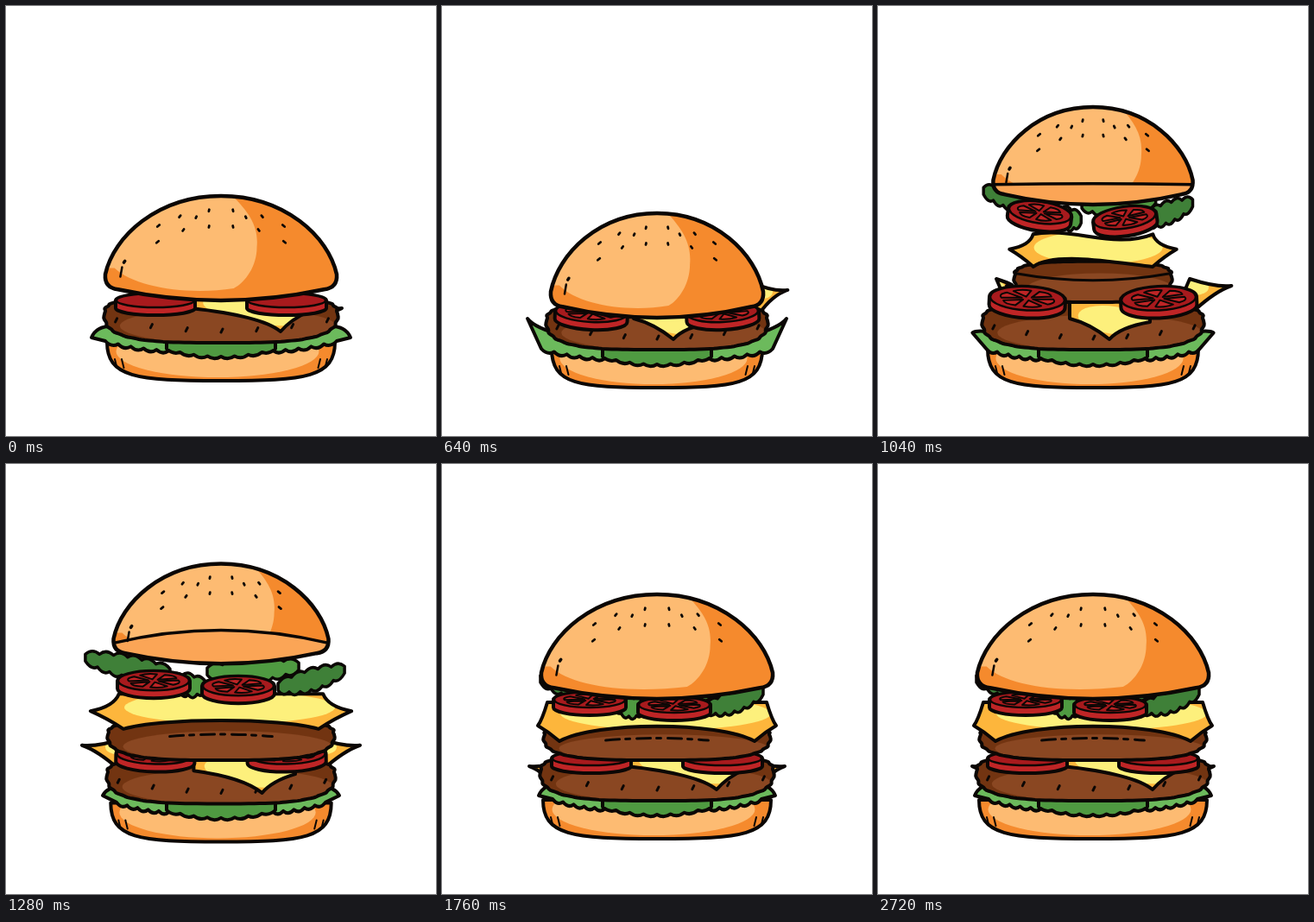
Write an HTML page with a canvas that moves like this. It is 498x498 px and loops after 2960 ms.

```html
<!DOCTYPE html>
<html lang="en">
<head>
<meta charset="utf-8">
<title>Burger</title>
<style>
html, body { margin: 0; width: 100%; height: 100%; overflow: hidden; background: #fff; }
canvas { display: block; }
</style>
</head>
<body>
<canvas id="stage" width="498" height="498"></canvas>
<script>
const ctx = document.getElementById('stage').getContext('2d');
const LOOP = 2960, STEP = 80, LAST = 2720, CX = 249;
const INK = '#0b0705', BUN = '#fdbb72', CRUST = '#f58a2d', UNDER = '#fba556';
const MEAT = '#8a4722', CHAR = '#723411', CHEESE = '#fdf07c', AMBER = '#fdb63c';
const LEAF = '#6cba5c', GREEN = '#4f9a41', DARK_GREEN = '#3f8038';
const RED = '#bf2526', DARK_RED = '#a81a1d';

const mix = (a, b, k) => a + (b - a) * k;
const ramp = (now, from, to) => Math.min(1, Math.max(0, (now - from) / (to - from)));
const ease = (now, from, to) => (1 - Math.cos(Math.PI * ramp(now, from, to))) / 2;

// The whole motion comes from a few values between 0 and 1.
function motionAt(now) {
  return {
    crouch: ease(now, 320, 640) - ease(now, 1040, 1480),
    stack: ramp(now, 720, 1120),
    lift: Math.sin(Math.PI * ramp(now, 880, 1400)) ** 2,
    grow: ramp(now, 720, 1200) ** 2,
    flick: ease(now, 160, 640) - ease(now, 640, 1240),
    flutter: ease(now, 240, 800) - ease(now, 1240, 1480),
    settle: ease(now, 1760, 2080),
    tilt: ramp(now, 1040, 1280),
    falling: now >= 1160
  };
}

function paint(path, fill, width = 4) {
  if (fill) { ctx.fillStyle = fill; ctx.fill(path); }
  if (width) { ctx.lineWidth = width; ctx.strokeStyle = INK; ctx.stroke(path); }
}

function paintLit(path, fill, lightFill, ...ellipse) {
  const light = new Path2D();
  light.ellipse(...ellipse, 0, 7);
  paint(path, fill, 0);
  ctx.save();
  ctx.clip(path);
  paint(light, lightFill, 0);
  ctx.restore();
  paint(path);
}

function line(x0, y0, x1, y1, width = 3) {
  const p = new Path2D();
  p.moveTo(x0, y0);
  p.lineTo(x1, y1);
  paint(p, null, width);
}

// Scalloped edge from one point to another, sagging in the middle.
function scallop(p, x0, y0, x1, y1, count, depth, sag = 0) {
  const at = k => [mix(x0, x1, k), mix(y0, y1, k) + 4 * sag * k * (1 - k)];
  p.lineTo(x0, y0);
  for (let i = 1; i <= count; i++) {
    const [mx, my] = at((i - .5) / count);
    p.quadraticCurveTo(mx, my + depth, ...at(i / count));
  }
}

function bottomBun({ crouch }) {
  const w = 132 - 10 * crouch, b = 434 + 8 * crouch, top = b - 45;
  const p = new Path2D();
  p.moveTo(CX - w, top);
  p.bezierCurveTo(CX - w, b - 4, CX - .75 * w, b, CX, b);
  p.bezierCurveTo(CX + .75 * w, b, CX + w, b - 4, CX + w, top);
  p.closePath();
  paintLit(p, CRUST, BUN, CX - 4, b - 34, w * .89, 30, 0);
  for (const side of [-1, 1])
    for (const inset of [9, 17])
      line(CX + side * (w - inset), b - 25, CX + side * (w - inset - 2.5), b - 15, 2);
}

function lettuce({ crouch, flick, stack }) {
  const y = 388 + 9 * crouch, reach = 150 - 13 * stack, tipY = 384 - 22 * flick;
  for (const side of [-1, 1]) {
    const p = new Path2D(), x = d => CX + side * d;
    p.moveTo(x(reach), tipY);
    p.quadraticCurveTo(x(reach - 8), y - 24, x(reach - 45), y - 14);
    p.lineTo(x(60), y - 10);
    scallop(p, x(60), y + 11, x(reach - 16), y, 5, 6, 2);
    p.closePath();
    paint(p, LEAF);
  }
  const middle = new Path2D();
  middle.moveTo(CX + 63, y - 10);
  middle.lineTo(CX - 63, y - 10);
  scallop(middle, CX - 63, y + 9, CX + 63, y + 9, 8, 5, 9);
  middle.closePath();
  paint(middle, GREEN);
}

function pattyShape(w, top, b) {
  const p = new Path2D(), mid = (top + b) / 2 - 6;
  const bend = (v, power) => Math.sign(v) * Math.abs(v) ** power;
  for (let a = 0; a < 2 * Math.PI; a += .04) {
    const s = Math.sin(a), bump = Math.sin(a * 26) * .9;
    p.lineTo(CX + (w - 1) * bend(Math.cos(a), .6) + bump, mid + (s > 0 ? b - mid : mid - top) * bend(s, .7));
  }
  p.closePath();
  paintLit(p, CHAR, MEAT, CX + 8, mid + 14, w * .92, (b - top) * .38, 0);
}

function lowerPatty({ crouch }) {
  const w = 136 - 7 * crouch, top = 335 + 8 * crouch, b = top + 55;
  pattyShape(w, top, b);
  for (let u = -.9; u < 1; u += .3) {
    const x = CX + u * w, y = b - 12 - 15 * u * u;
    line(x, y, x + 2, y - 4);
  }
}

function upperPatty({ crouch, lift, grow, falling }) {
  const w = mix(60, 132, grow), top = 300 - 18 * lift + 8 * crouch, seam = new Path2D();
  pattyShape(w, top, 343);
  const half = w * (falling ? .45 : .97), y = falling ? top + 20 : top + 14;
  seam.moveTo(CX - half, y);
  seam.quadraticCurveTo(CX, falling ? y - 5 : y + 16, CX + half, y);
  if (falling) ctx.setLineDash([16, 7, 5, 8]);
  paint(seam, null, 3);
  ctx.setLineDash([]);
}

function cheeseCorners({ flutter, stack, settle, tilt }) {
  const reach = 140 + 14 * flutter + 8 * stack * (1 - settle), y = 350 - 26 * flutter;
  for (const side of [-1, 1]) {
    const x = d => CX + side * d, tip = side > 0 ? reach : mix(100, reach, tilt);
    const p = new Path2D();
    p.moveTo(x(100), y + 20);
    p.lineTo(x(112), y - 8);
    p.quadraticCurveTo(x(tip - 18), y + 2, x(tip), y);
    p.quadraticCurveTo(x(tip - 18), y + 6, x(118), y + 28);
    paintLit(p, AMBER, CHEESE, x(118), y + 2, 16, 9, 0);
  }
}

function cheeseFlap({ crouch }) {
  const left = 214 + 8 * crouch, y = 350 + 12 * crouch, right = 350 - 35 * crouch;
  const tipX = 318 - 50 * crouch, tipY = 377 + 9 * crouch, p = new Path2D();
  p.moveTo(left, 338);
  p.lineTo(left, y);
  p.quadraticCurveTo(tipX - 22, tipY - 18, tipX, tipY);
  p.quadraticCurveTo(tipX + 12, tipY - 14, right, y + 4);
  p.lineTo(right, 338);
  p.closePath();
  paintLit(p, AMBER, CHEESE, mix(left, right, .55), y + 2, (right - left) * .45, 16, .15);
}

function tomato(x, y, rx, ry, thick, turn) {
  const body = new Path2D(), face = new Path2D();
  ctx.save();
  ctx.translate(x, y);
  ctx.rotate(turn);
  body.ellipse(0, 0, rx, ry, 0, Math.PI, 0);
  body.ellipse(0, thick, rx, ry, 0, 0, Math.PI);
  body.closePath();
  paint(body, RED);
  face.ellipse(0, 0, rx - 1, ry, 0, 0, 7);
  paint(face, DARK_RED, 2.5);
  if (ry > 8.5) {
    const at = (a, r) => [Math.cos(a) * rx * r, Math.sin(a) * ry * r];
    for (let a = .3; a < 6; a += Math.PI / 3) {
      const cell = new Path2D();
      cell.moveTo(...at(a, .15));
      cell.lineTo(...at(a - .36, .68));
      cell.quadraticCurveTo(...at(a, .82), ...at(a + .36, .68));
      cell.closePath();
      paint(cell, RED, 2);
    }
  }
  ctx.restore();
}

function lowerTomatoes({ crouch, lift }) {
  const y = 341 + 14 * crouch - 24 * lift, ry = 8 + 3 * crouch + 4 * lift;
  for (const side of [-1, 1])
    tomato(CX + side * 76, y, 46 - 4 * crouch + 3 * lift, ry, 9, -.05 * side * crouch);
}

function upperTomatoes({ lift, grow }) {
  for (const side of [-1, 1])
    tomato(220 + side * 49 + 30 * (1 - grow), 276 - 50 * lift + 3 * side, 33 + 9 * grow, 9 + 5 * lift, 9, -.25 * side * (1 - grow));
}

function cheeseSheet({ crouch, lift, grow }) {
  const span = .3 + .7 * grow, wave = 16 * (1 - grow);
  const x = d => CX + d * span, p = new Path2D();
  const tip = 138 + 30 * lift, shoulder = 127 - 20 * lift, corner = 113;
  const tipY = 303 - 52 * lift + 14 * crouch, top = 276 - 32 * lift + 10 * crouch;
  const cornerY = 321 - 40 * lift + 8 * crouch, middle = 298 - 10 * lift;
  const edge = side => [x(side * (shoulder + 6)), mix(top, tipY, .75)];
  p.moveTo(x(-tip), tipY);
  p.quadraticCurveTo(...edge(-1), x(-shoulder), top);
  p.bezierCurveTo(x(-40), top - wave, x(40), top + 2 * wave, x(shoulder), top);
  p.quadraticCurveTo(...edge(1), x(tip), tipY);
  p.quadraticCurveTo(x((tip + corner) / 2), mix(tipY, cornerY, .4), x(corner), cornerY);
  p.bezierCurveTo(x(70), middle + wave, x(-70), middle - wave, x(-corner), cornerY);
  p.quadraticCurveTo(x(-(tip + corner) / 2), mix(tipY, cornerY, .4), x(-tip), tipY);
  p.closePath();
  paintLit(p, AMBER, CHEESE, x(10), (top + middle) / 2 + 2, 122 * span, 19, 0);
}

const leaves = [[92, 223, 190, 240, DARK_GREEN], [190, 250, 232, 256, GREEN],
  [233, 239, 339, 233, GREEN], [315, 257, 392, 237, DARK_GREEN]];

function upperLettuce({ crouch, lift, grow }) {
  const spread = (.55 + .45 * grow) * (.86 + .32 * lift), drop = 26 - 66 * lift + 10 * crouch;
  for (const [x0, y0, x1, y1, fill] of leaves) {
    const p = new Path2D(), left = CX + (x0 - CX) * spread, right = CX + (x1 - CX) * spread;
    const count = Math.round((x1 - x0) / 20) + 1;
    p.moveTo(left, y0 + drop);
    scallop(p, left, y0 + drop - 4, right, y1 + drop - 4, count, -7, -5);
    scallop(p, right, y1 + drop + 4, left, y0 + drop + 4, count + 1, 7, 9);
    p.closePath();
    paint(p, fill, 3.5);
  }
}

// Seed offsets on one half of the bun; the other half mirrors them.
const seeds = [[14, 17], [14, 36], [29, 25], [48, 24], [44, 40], [73, 35], [74, 54]];

function topBun({ crouch, stack, lift, tilt }) {
  const w = 134 - 11 * crouch - 11 * lift, height = 121 - 12 * lift;
  const b = 341 + 20 * crouch - 69 * stack - 112 * lift, top = b - height;
  const edge = b - .25 * height, h = edge - top, corner = mix(edge, b, .58);
  const shade = .31 + .15 * stack + .08 * lift;
  const X = u => CX + u * w, Y = v => edge + v * h;
  const p = new Path2D(), light = new Path2D(), under = new Path2D();

  p.moveTo(X(-1), edge);
  p.bezierCurveTo(X(-.93), Y(-.48), X(-.55), top, CX, top);
  p.bezierCurveTo(X(.55), top, X(.93), Y(-.48), X(1), edge);
  p.quadraticCurveTo(X(1.01), corner - 2, X(.89), corner);
  p.quadraticCurveTo(CX, 2 * b - corner, X(-.89), corner);
  p.quadraticCurveTo(X(-1.01), corner - 2, X(-1), edge);
  p.closePath();

  light.moveTo(X(-1.1), Y(-1.1));
  light.lineTo(X(shade - .28), Y(-1.1));
  light.bezierCurveTo(X(shade - .1), Y(-.85), X(shade + .02), Y(-.65), X(shade), Y(-.35));
  light.bezierCurveTo(X(shade), Y(-.1), X(shade - .1), Y(.1), X(shade - .2), Y(.18));
  light.bezierCurveTo(X(-.3), Y(.27), X(-.75), Y(.16), X(-.92), Y(-.08));
  light.lineTo(X(-1.1), Y(-.08));

  const rim = mix(30, 4 - 14 * tilt, Math.min(1, 3 * lift));
  under.moveTo(X(-1), edge + 5);
  under.quadraticCurveTo(CX, edge + 2 * rim - 5, X(1), edge + 5);
  under.lineTo(X(1), b + 9);
  under.lineTo(X(-1), b + 9);
  under.closePath();

  paint(p, CRUST, 0);
  ctx.save();
  ctx.clip(p);
  paint(light, BUN, 0);
  if (rim < b - edge - 6) paint(under, UNDER, 3.5);
  ctx.restore();
  paint(p, null, 4.5);

  for (const side of [-1, 1])
    for (const [dx, dy] of seeds) {
      const x = X(side * dx / 135), y = top + dy / 92 * h, lean = side * dx / 60;
      line(x - lean, y - 1, x + lean, y + 1, 2.8);
    }
  line(X(-.87), Y(.03), X(-.855), Y(-.09), 2.5);
  line(X(-.84), Y(-.15), X(-.83), Y(-.17), 3.5);
}

function draw(now) {
  const m = motionAt(now);
  ctx.clearRect(0, 0, 498, 498);
  ctx.lineJoin = ctx.lineCap = 'round';
  const layers = [bottomBun, lettuce, cheeseCorners, lowerPatty, cheeseFlap, lowerTomatoes];
  if (m.grow > 0) {
    layers.splice(m.falling ? 6 : 5, 0, upperPatty);
    layers.push(cheeseSheet, upperLettuce, upperTomatoes);
  }
  layers.push(topBun);
  layers.forEach(layer => layer(m));
}

function tick() {
  draw(Math.min(LAST, Math.floor(performance.now() % LOOP / STEP) * STEP));
  requestAnimationFrame(tick);
}
tick();
</script>
</body>
</html>
```
